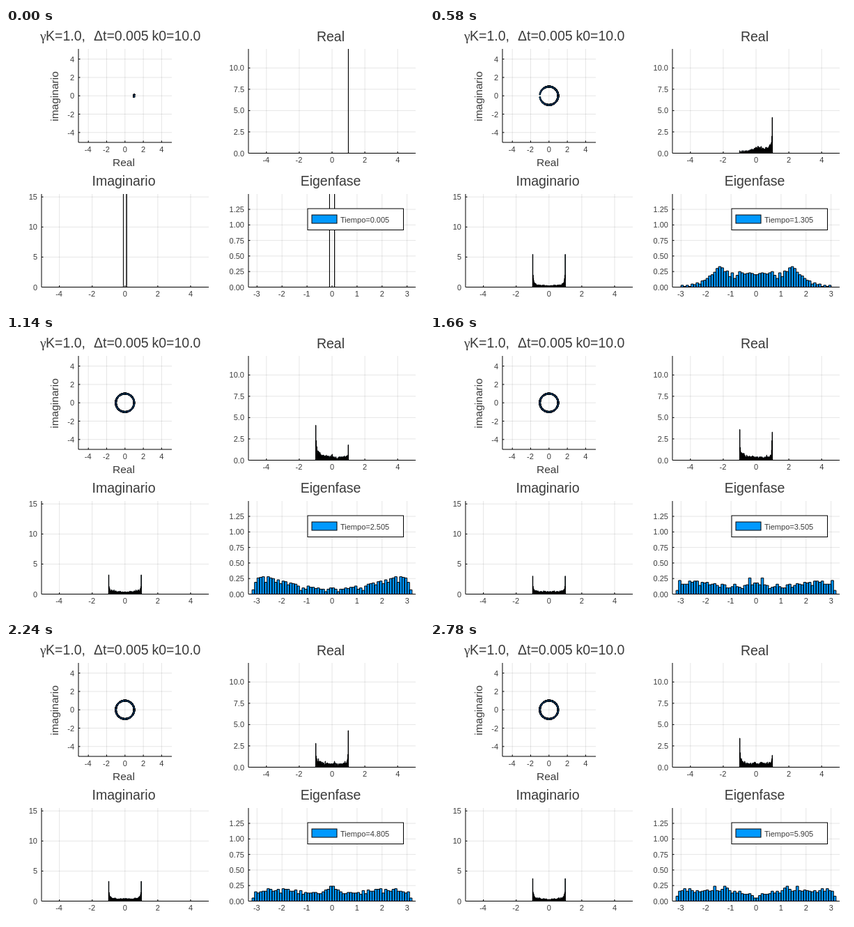
An HTML page with a canvas that plays this animation: 600 by 400 pixels, repeating every 2.88 s.

```html
<!DOCTYPE html>
<html lang="es">
<head>
<meta charset="utf-8">
<title>Eigenfase</title>
<style>
  html, body { margin: 0; width: 100%; height: 100%; overflow: hidden; background: #fff; }
  svg, canvas { position: absolute; left: 0; top: 0; width: 600px; height: 400px; }
  text { font-family: "Liberation Sans", Arial, sans-serif; fill: #3a3a3a; white-space: pre; }
  .title { font-size: 19.5px; }
  .label { font-size: 15.5px; }
  .tick { font-size: 11px; }
  .serif { font-family: "Liberation Serif", serif; }
  .mid { text-anchor: middle; }
  .end { text-anchor: end; }
  .grid { stroke: #000; stroke-opacity: .1; }
  .axis { stroke: #000; fill: none; }
</style>
</head>
<body>
<svg id="axes" viewBox="0 0 600 400">
  <text class="title serif" x="49" y="18">γ</text>
  <text class="title" x="57" y="18">K=1.0,</text>
  <text class="title" x="126" y="18">Δt=0.005</text>
  <text class="title" x="209.5" y="18">k0=10.0</text>
  <text class="title mid" x="466" y="19">Real</text>
  <text class="title mid" x="169" y="226">Imaginario</text>
  <text class="title mid" x="466" y="226">Eigenfase</text>
  <text class="label mid" x="169" y="198">Real</text>
  <text class="label mid" transform="translate(75 98) rotate(-90)">imaginario</text>
</svg>
<canvas id="plot" width="600" height="400"></canvas>
<svg viewBox="0 0 600 400">
  <rect class="axis" x="433" y="259" width="137.5" height="30.5" style="fill:#fff"/>
  <rect class="axis" x="439" y="268" width="36" height="12" style="fill:#09f"/>
  <text class="tick" id="clock" x="480" y="279"></text>
</svg>
<script>
const FRAMES = 60, LOOP = 2880, PAIRS = 500, BLUE = '#09f';

// x0, y0: pixel of the data origin; ux, uy: pixels per unit
const ring = { left: 104, right: 238, top: 30, bottom: 164, x0: 170.8, y0: 97.2, ux: 13.15, uy: 13.15,
  xs: [-4, -2, 0, 2, 4], ys: [-4, -2, 0, 2, 4], digits: 0 };
const real = { left: 348, right: 588, top: 30, bottom: 179.5, x0: 468, y0: 179.5, ux: 23.55, uy: 12.22,
  xs: [-4, -2, 0, 2, 4], ys: [0, 2.5, 5, 7.5, 10], digits: 1 };
const imag = { left: 51, right: 291, top: 238, bottom: 371.5, x0: 170.8, y0: 371.5, ux: 23.55, uy: 8.62,
  xs: [-4, -2, 0, 2, 4], ys: [0, 5, 10, 15], digits: 0 };
const phase = { left: 348, right: 588, top: 238, bottom: 371.5, x0: 468, y0: 371.5, ux: 35.9, uy: 89.2,
  xs: [-3, -2, -1, 0, 1, 2, 3], ys: [0, .25, .5, .75, 1, 1.25], digits: 2 };

// Density of the phase at 0.05, 0.25 ... 3.05 for some frame indices
const profiles = [
  [13, [.21, .24, .22, .25, .22, .25, .25, .33, .25, .20, .11, .08, .05, .03, .02, .01]],
  [25, [.10, .05, .08, .10, .11, .09, .08, .16, .17, .18, .21, .25, .30, .20, .26, .18]],
  [35, [.18, .20, .12, .09, .15, .11, .15, .12, .17, .14, .19, .17, .20, .20, .19, .20]],
  [43, [.22, .13, .14, .08, .13, .15, .19, .20, .18, .12, .16, .18, .17, .17, .19, .15]],
  [53, [.21, .19, .16, .18, .13, .10, .13, .15, .16, .25, .14, .15, .22, .21, .14, .12]],
  [59, [.06, .14, .11, .16, .13, .16, .23, .20, .21, .15, .16, .14, .18, .18, .19, .20]]
];

const ctx = document.getElementById('plot').getContext('2d');
const clock = document.getElementById('clock');
const axes = document.getElementById('axes');
const mix = (a, b, u) => a + (b - a) * u;

function add(name, attrs, text = '') {
  const node = document.createElementNS(axes.namespaceURI, name);
  for (const key in attrs) node.setAttribute(key, attrs[key]);
  node.textContent = text;
  axes.append(node);
}

function drawAxes(p) {
  const line = (cls, d) => add('path', { class: cls, d });
  const bottom = p.bottom;
  for (const v of p.xs) {
    const x = p.x0 + v * p.ux;
    line('grid', `M${x} ${p.top}V${bottom}`);
    line('axis', `M${x} ${bottom}v-2.5`);
    add('text', { class: 'tick mid', x: v < 0 ? x - .5 : x, y: bottom + 13.5 }, v);
  }
  for (const v of p.ys) {
    const y = p.y0 - v * p.uy;
    line('grid', `M${p.left} ${y}H${p.right}`);
    line('axis', `M${p.left} ${y}h2.5`);
    add('text', { class: 'tick end', x: p.left - 6, y: y + 4 }, v.toFixed(p.digits));
  }
  line('axis', `M${p.left} ${p.top}V${bottom}H${p.right}`);
}

function seeded(seed) {
  return () => {
    seed = (seed + 0x6D2B79F5) | 0;
    let h = Math.imul(seed ^ (seed >>> 15), 1 | seed);
    h = (h + Math.imul(h ^ (h >>> 7), 61 | h)) ^ h;
    return ((h ^ (h >>> 14)) >>> 0) / 4294967296;
  };
}

function profileAt(k) {
  let j = 0;
  while (j < profiles.length - 2 && profiles[j + 1][0] <= k) j++;
  const [k0, a] = profiles[j], [k1, b] = profiles[j + 1];
  const u = Math.max(0, (k - k0) / (k1 - k0));
  return a.map((v, i) => mix(v, b[i], u));
}

// Positive phases drawn from the density by inverting its cumulative sum
function samplePhases(k) {
  if (k === 0) return Array(PAIRS).fill(.1);
  const rand = seeded(k * 7919), knots = profileAt(k);
  const weights = Array.from({ length: 32 }, (_, i) => {
    const a = knots[i >> 1], b = knots[Math.min(15, (i >> 1) + 1)];
    return mix(a, b, i % 2 / 2) * (1 + .4 * (rand() - .5)) * (i === 31 ? .416 : 1);
  });
  const total = weights.reduce((a, b) => a + b);
  const spread = Math.min(1, ((k * .1 + .005) / 1.305) ** .6);
  // Groups of four keep the counts even but leave the fine bins ragged
  const levels = Array.from({ length: PAIRS }, (_, i) => ((i >> 2) + rand()) * 4 / PAIRS * total);
  let bin = 0, below = 0;
  return levels.sort((a, b) => a - b).map(level => {
    while (bin < 31 && below + weights[bin] < level) below += weights[bin++];
    const width = bin === 31 ? .0416 : .1;
    return spread * (bin * .1 + width * Math.min(1, (level - below) / weights[bin]));
  });
}

function histogram(p, values, width) {
  const counts = new Map();
  for (const v of values) {
    const bin = Math.floor(v / width);
    counts.set(bin, (counts.get(bin) || 0) + 1);
  }
  ctx.save();
  ctx.beginPath();
  ctx.rect(p.left, p.top, p.right - p.left, p.bottom - p.top + .5);
  ctx.clip();
  ctx.beginPath();
  for (const [bin, count] of counts) {
    const height = count / (values.length * width) * p.uy;
    ctx.rect(p.x0 + bin * width * p.ux, p.y0, width * p.ux, -height);
  }
  ctx.fill();
  ctx.stroke();
  ctx.restore();
}

function drawRing(angles) {
  const n = angles.length;
  for (let i = 0; i < n; i++) {
    const a = angles[i * 137 % n];
    ctx.beginPath();
    ctx.arc(ring.x0 + Math.cos(a) * ring.ux, ring.y0 - Math.sin(a) * ring.uy, .9, 0, 7);
    ctx.fill();
    ctx.stroke();
  }
}

function draw(k) {
  const angles = samplePhases(k).flatMap(a => [a, -a]);
  const fine = k ? .02 : .002;
  ctx.clearRect(0, 0, 600, 400);
  ctx.fillStyle = BLUE;
  ctx.strokeStyle = '#000';
  ctx.lineWidth = .8;
  drawRing(angles);
  ctx.lineWidth = 1;
  histogram(real, angles.map(Math.cos), fine);
  histogram(imag, angles.map(Math.sin), fine);
  histogram(phase, angles, k ? .1 : .002);
  clock.textContent = 'Tiempo=' + (k * .1 + .005).toFixed(3);
}

// Frames last 20, 100 and 20 ms in turn; the last one is held
function frameAt(ms) {
  const rest = ms % 140;
  const k = 3 * Math.floor(ms / 140) + (rest < 20 ? 0 : rest < 120 ? 1 : 2);
  return Math.min(FRAMES - 1, k);
}

[ring, real, imag, phase].forEach(drawAxes);
const start = performance.now();
let shown = -1;
function tick() {
  const k = frameAt((performance.now() - start) % LOOP);
  if (k !== shown) draw(shown = k);
  requestAnimationFrame(tick);
}
tick();
</script>
</body>
</html>
```
